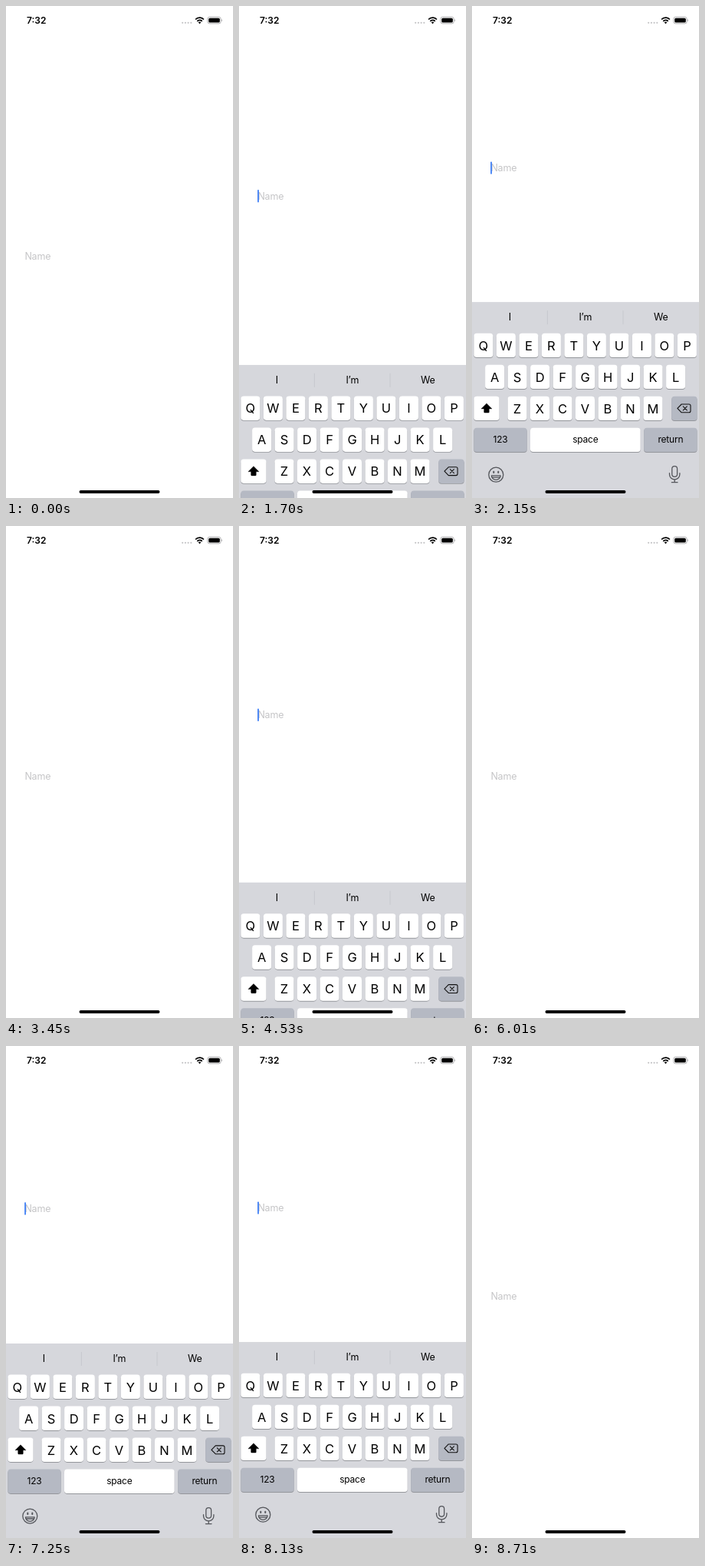
An HTML page for the animation above (8900 ms loop, 296 px wide and 640 px high).

```html
<!DOCTYPE html>
<html lang="en">
<head>
<meta charset="utf-8">
<title>Text field and keyboard</title>
<style>
  html, body { margin: 0; width: 100%; height: 100%; overflow: hidden; background: #fff; }
  svg { display: block; width: 100vw; height: 100vh; font-family: Inter, Roboto, sans-serif; }
  .mid { text-anchor: middle; }
  .letter { font-size: 16.5px; }
  .label { font-size: 12px; letter-spacing: -.2px; }
  .hint { font-size: 12.5px; letter-spacing: -.2px; }
  .line { fill: none; stroke: #54565b; stroke-width: 1.3; stroke-linecap: round; stroke-linejoin: round; }
</style>
</head>
<body>
<svg viewBox="0 0 296 640">
  <rect width="296" height="640" fill="#fff"/>

  <g id="status">
    <text x="27" y="23" font-size="12" font-weight="600">7:32</text>
    <g fill="#c4c4c6">
      <circle cx="230.2" cy="21.8" r="1.1"/><circle cx="233.9" cy="21.8" r="1.1"/>
      <circle cx="237.6" cy="21.8" r="1.1"/><circle cx="241.3" cy="21.8" r="1.1"/>
    </g>
    <g fill="none" stroke="#000" stroke-width="1.8">
      <path d="M247.1 17.5a7.5 7.5 0 0 1 10.8 0"/>
      <path d="M249.3 19.8a4.5 4.5 0 0 1 6.4 0"/>
    </g>
    <path d="M252.5 23.2l-1.8-1.9a2.6 2.6 0 0 1 3.6 0z"/>
    <rect x="262.8" y="14.3" width="17.4" height="8.6" rx="2.6" fill="none" stroke="#a9a9ab" stroke-width=".9"/>
    <rect x="264.2" y="15.7" width="14.6" height="5.8" rx="1.5"/>
    <path d="M281.2 17.2a1.6 1.6 0 0 1 0 2.9z" fill="#a9a9ab"/>
  </g>

  <g id="field">
    <text x="24.4" y="329.6" class="hint" fill="#c5c5c7">Name</text>
    <rect id="caret" x="24.2" y="316.9" width="1.7" height="16.4" rx=".8" fill="#3478f6"/>
  </g>

  <g id="board">
    <rect y="385" width="296" height="260" fill="#d6d7dc"/>
    <path d="M98.4 396v18M197 396v18" stroke="#c3c4ca" stroke-width=".8"/>
    <g id="keys"></g>
    <path d="M19 516.8l7 7h-3.7v4.3q0 .9-.9.9h-4.8q-.9 0-.9-.9v-4.3H12z" stroke="#000" stroke-width=".4" stroke-linejoin="round"/>
    <g class="line" style="stroke:#111;stroke-width:1.1">
      <path d="M273.2 517.9h9.8q2 0 2 2v6.8q0 2-2 2h-9.8l-5.3-5.4z"/>
      <path d="M275.3 520.8l5 5M280.3 520.8l-5 5"/>
    </g>
    <g class="line">
      <circle cx="31.3" cy="609.6" r="9.5"/>
      <path d="M25.4 610.8h11.8a5.9 5.5 0 0 1-11.8 0zM26.4 613h9.8"/>
      <path d="M28.3 605.6v1.4M34.3 605.6v1.4" stroke-width="2"/>
      <rect x="260.8" y="598.6" width="6.8" height="13.6" rx="3.4"/>
      <path d="M257.5 607.6v1.6a6.7 6.7 0 0 0 13.4 0v-1.6M264.2 616v3.6M260.4 619.6h7.6"/>
    </g>
  </g>

  <rect x="95.5" y="630" width="105" height="4" rx="2"/>
</svg>
<script>
const LOOP = 8900, OMEGA = 18.26;
const KEYBOARD = 256, LIFT = 114.5;
const GREY = '#b5b9c3';
const $ = id => document.getElementById(id);

// Times in ms; show and hide are [start, end, steps, lead].
const rounds = [
  { show: [1590, 2350, 8, 20], dim: 2250, off: 2350, on: 2580, full: 2580,
    press: 2920, hide: [3026, 3450, 5, 20] },
  { show: [4420, 5090, 7, 20], dim: 4980, off: 5090, on: 5370, full: 5370,
    press: 5370, hide: [5584, 6010, 5, 20] },
  { show: [6920, 7460, 6, 55], dim: 7460, off: 7600, on: 7860, full: 8020,
    press: 8020, hide: [8270, 8710, 5, 20] }
];

function add(tag, attrs, text) {
  const el = document.createElementNS('http://www.w3.org/2000/svg', tag);
  for (const k in attrs) el.setAttribute(k, attrs[k]);
  if (text) el.textContent = text;
  return $('keys').appendChild(el);
}

const rowTop = row => 425.6 + 41 * row;

function key(x, row, width, fill, text, cls) {
  const y = rowTop(row), box = { x, width, height: 31.4, rx: 3.8 };
  add('rect', { ...box, y: y + 0.9, fill: '#94969b' });
  const face = add('rect', { ...box, y, fill });
  const base = y + (cls === 'letter' ? 21.9 : 19.4);
  if (text) add('text', { x: x + width / 2, y: base, class: 'mid ' + cls }, text);
  return face;
}

['QWERTYUIOP', 'ASDFGHJKL', 'ZXCVBNM'].forEach((row, r) => {
  const left = [2.4, 17.1, 46.5][r];
  [...row].forEach((c, i) => key(left + 29.5 * i, r, 25, '#fff', c, 'letter'));
});
key(2.4, 2, 33.2, '#fff');
key(260.3, 2, 33.2, GREY);
key(2.4, 3, 69.2, GREY, '123', 'label');
key(76, 3, 143.7, '#fff', 'space', 'label');
const enter = key(224.2, 3, 69.3, GREY, 'return', 'label');
['I', 'I’m', 'We'].forEach((word, i) =>
  add('text', { x: 49.3 + 98.5 * i, y: 409.4, class: 'mid hint' }, word));

function spring(t, [start, end, steps, lead]) {
  if (t < start) return 0;
  const gap = (end - start) / (steps - 1);
  const n = Math.min(steps - 1, Math.floor((t - start + 1) / gap));
  const s = (n * gap + lead) / 1000 * OMEGA;
  return 1 - (1 + s) * Math.exp(-s);
}

function caretAlpha(t, r) {
  if (t < r.show[0] || t >= r.hide[0]) return 0;
  if (t < r.dim || t >= r.full) return 1;
  return t >= r.off && t < r.on ? 0 : 0.5;
}

function draw(t) {
  const r = rounds.find(r => t < r.hide[1]);
  const up = r ? spring(t, r.show) - spring(t, r.hide) : 0;
  const pressed = r && t >= r.press && t < r.press + 108;
  $('field').setAttribute('transform', `translate(0 ${-LIFT * up})`);
  $('board').setAttribute('transform', `translate(0 ${KEYBOARD * (1 - up)})`);
  $('caret').setAttribute('opacity', r ? caretAlpha(t, r) : 0);
  enter.setAttribute('fill', pressed ? '#fff' : GREY);
}

const begin = performance.now();
function tick() {
  draw((performance.now() - begin) % LOOP);
  requestAnimationFrame(tick);
}
tick();
</script>
</body>
</html>
```
